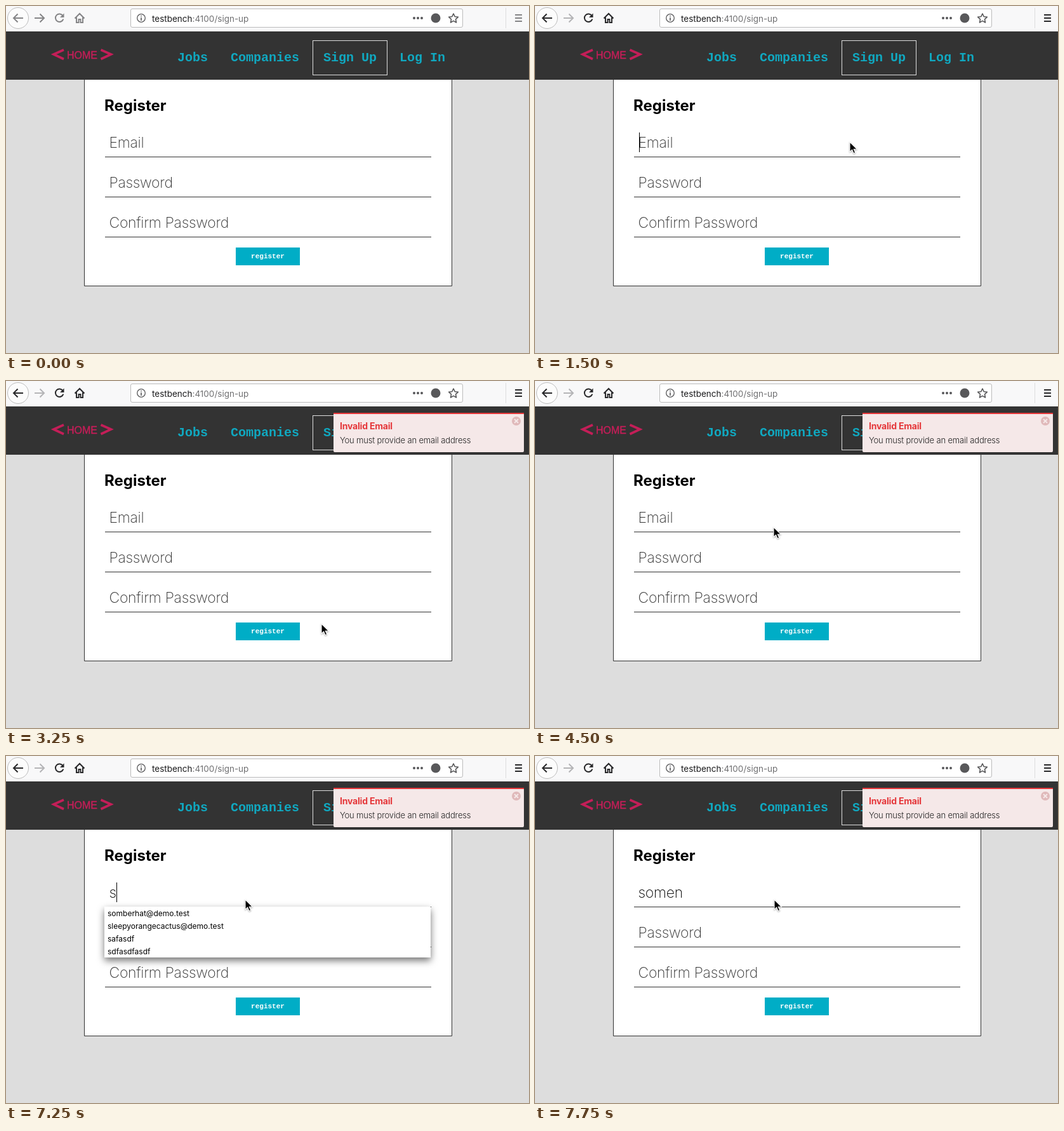
Recreate the animation shown at these times as an HTML page. Size 824 by 546 pixels, loop 8000 ms.

```html
<!DOCTYPE html>
<html lang="en">
<head>
<meta charset="utf-8">
<title>Register form</title>
<style>
html, body { margin: 0; width: 100%; height: 100%; overflow: hidden; background: #ddd; }
svg { display: block; width: 824px; height: 546px; font-family: Inter, Roboto, sans-serif; }
.line { fill: none; stroke: currentColor; stroke-width: 2; }
.url { font-size: 13.5px; }
.nav { font: bold 20px "Liberation Mono", monospace; fill: #10a8c0; }
.home { font: 16px "Liberation Sans", sans-serif; fill: #c41e58; stroke: #c41e58; stroke-width: .4; }
.field { font-size: 23px; font-weight: 200; letter-spacing: -.3px; fill: #333; }
.rule { stroke: #333; }
#typed { fill: #000; }
#list { filter: drop-shadow(0 5px 6px rgba(0, 0, 0, .55)); font-size: 12px; }
#cursor { filter: drop-shadow(0 1px 1px rgba(0, 0, 0, .35)); }
</style>
</head>
<body>
<svg viewBox="0 0 824 546">
  <rect width="824" height="546" fill="#ddd"/>

  <!-- browser bar -->
  <rect width="824" height="40" fill="#f8f8f9"/>
  <circle cx="19" cy="19" r="16.5" fill="#fcfcfc" stroke="#bbb"/>
  <g id="tools">
    <path class="line" d="M27 19H12M18.5 12.5L12 19L18.5 25.5"/>
    <path class="line" d="M89.5 15.2A6.3 6.3 0 1 0 90.3 20.5"/>
    <path d="M91.5 11.5V18H85Z" fill="currentColor"/>
    <path class="line" d="M108.500 19.500L116 12L123.500 19.500M111 18V26H114.500V21H117.500V26H121V18"/>
    <path class="line" d="M802 14H813M802 19H813M802 24H813"/>
  </g>
  <path id="forward" class="line" d="M45 19H60M53.500 12.500L60 19L53.500 25.500"/>
  <path d="M787.500 3V35" stroke="#ddd"/>
  <rect x="196.500" y="4.500" width="523" height="29" rx="2.500" fill="#fff" stroke="#bbb"/>
  <g color="#58585a">
    <circle cx="213" cy="19" r="6.300" fill="none" stroke="currentColor" stroke-width="1.300"/>
    <path d="M213 15V16.600M213 18V23" stroke="currentColor" stroke-width="1.600"/>
    <g fill="currentColor">
      <circle cx="643" cy="19" r="2"/><circle cx="649" cy="19" r="2"/><circle cx="655" cy="19" r="2"/>
      <circle cx="677" cy="19" r="7.500"/>
    </g>
    <path class="line" style="stroke-width:1.600" stroke-linejoin="round"
      d="M705 12L707.200 16.700L712.300 17.300L708.500 20.800L709.500 26L705 23.400L700.500 26L701.500 20.800L697.700 17.300L702.800 16.700Z"/>
  </g>
  <text class="url" x="230" y="24.500" fill="#1c1c1e">testbench<tspan fill="#707072">:4100/sign-up</tspan></text>

  <!-- site navigation -->
  <rect y="40" width="824" height="76" fill="#333"/>
  <path d="M91 69L75 76L91 83.500M149.500 69L165.500 76L149.500 83.500" fill="none" stroke="#c41e58" stroke-width="3.600"/>
  <text class="home" x="96" y="83">HOME</text>
  <rect x="483.500" y="54.500" width="117" height="54" fill="none" stroke="#ddd"/>
  <g class="nav">
    <text x="270" y="87">Jobs</text><text x="354" y="87">Companies</text>
    <text x="500" y="87">Sign Up</text><text x="620" y="87">Log In</text>
  </g>

  <!-- form -->
  <path d="M123.500 116V440.500H702.500V116" fill="#fff" stroke="#333"/>
  <text x="155" y="165" font-size="24" font-weight="700">Register</text>
  <g class="field">
    <text id="hint" x="162.500" y="223">Email</text>
    <text id="typed" x="162.500" y="223"></text>
    <text x="162.500" y="286">Password</text>
    <text x="162.500" y="349">Confirm Password</text>
  </g>
  <path class="rule" d="M156 237.500H670M156 300.500H670M156 363.500H670"/>
  <rect x="362" y="380" width="101" height="28" fill="#00adc6"/>
  <text x="412.500" y="397" text-anchor="middle" fill="#fff"
    style="font:bold 11px 'Liberation Mono',monospace">register</text>
  <path id="caret" d="M0 199V230" stroke="#000"/>

  <g id="list">
    <rect x="155" y="237" width="514" fill="#fff"/>
    <text x="160" y="252">somberhat@demo.test</text>
    <g id="more">
      <text x="160" y="272">sleepyorangecactus@demo.test</text>
      <text x="160" y="292">safasdf</text>
      <text x="160" y="312">sdfasdfasdf</text>
    </g>
  </g>

  <g id="toast">
    <rect x="516" y="50" width="300" height="62" rx="2" fill="#f5e8e8"/>
    <path d="M516 51H816" stroke="#e5383b" stroke-width="2"/>
    <text x="526" y="76" font-size="14" font-weight="700" letter-spacing="-.2" fill="#e5383b">Invalid Email</text>
    <text x="526" y="98" font-size="13" font-weight="300" letter-spacing="-.15" fill="#222">You must provide an email address</text>
    <circle cx="804" cy="63" r="7" fill="#e0b9ba"/>
    <path d="M801 60L807 66M807 60L801 66" stroke="#f5e8e8" stroke-width="2"/>
  </g>

  <path id="cursor" d="M0 0V15.500L3.600 12.200L6 17.800L8.700 16.700L6.300 11.200H11.200Z"
    fill="#000" stroke="#fff" stroke-width="1.100"/>
</svg>
<script>
const $ = id => document.getElementById(id);
const show = (id, on) => $(id).style.display = on ? "" : "none";
const LOOP = 8000;

// Each row is a start time followed by the values held from then on.
const pointer = [
  [0, -50, -50], [500, 560, 156], [750, 504, 206], [1000, 499, 211], [1250, 496, 212],
  [1500, 496, 214], [2500, 440, 347], [2750, 448, 400], [3000, 447, 391], [3250, 497, 382],
  [4000, 491, 381], [4250, 387, 266], [4500, 376, 230], [4750, 377, 226]
];
const caret = [
  [0, 0], [1500, 1], [2000, 0], [2500, 1], [2750, 0], [5000, 1], [5500, 0],
  [6000, 1], [6500, 0], [7250, 1], [7750, 0]
];
const typing = [[0, "", 0], [6250, "s", 4], [7500, "som", 1], [7750, "somen", 0]];

const held = (rows, t) => rows.findLast(row => row[0] <= t).slice(1);

function draw(t) {
  const [x, y] = held(pointer, t);
  $("cursor").setAttribute("transform", `translate(${x} ${y})`);

  const active = t >= 1000;
  $("tools").style.color = active ? "#2a2a2c" : "#858587";
  $("forward").style.color = active ? "#b5b5b7" : "#858587";

  const [text, rows] = held(typing, t);
  $("typed").textContent = text;
  show("hint", !text);
  show("list", rows);
  show("more", rows > 1);
  $("list").firstElementChild.setAttribute("height", rows * 20);

  show("caret", held(caret, t)[0]);
  const caretX = text ? Math.round(163 + $("typed").getComputedTextLength()) + .5 : 164.5;
  $("caret").setAttribute("transform", `translate(${caretX} 0)`);

  const arriving = t < 3250;
  show("toast", t >= 3000);
  $("toast").setAttribute("transform", `translate(${arriving ? 192 : 0} 0)`);
  $("toast").setAttribute("opacity", arriving ? .1 : 1);
}

const start = performance.now();
function tick() {
  draw((performance.now() - start) % LOOP);
  requestAnimationFrame(tick);
}
tick();
</script>
</body>
</html>
```
